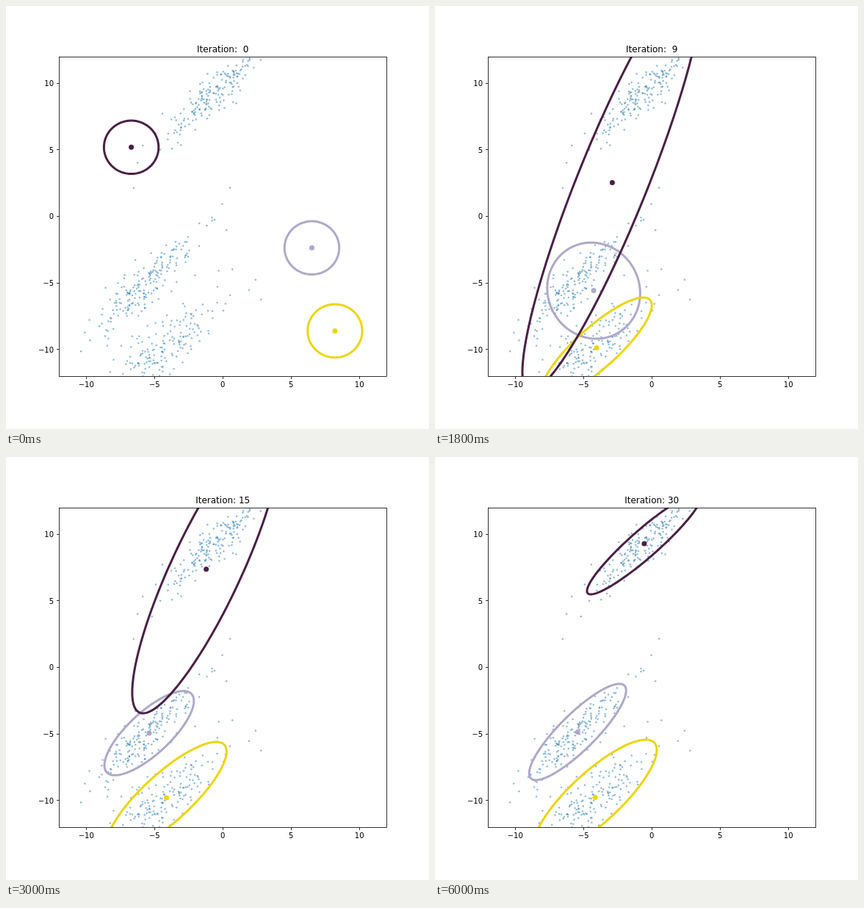
An HTML page that plays this animation: 576 px wide and 576 px high, repeating every 6200 ms.

```html
<!DOCTYPE html>
<html lang="en">
<head>
<meta charset="utf-8">
<title>Mixture fit</title>
<style>
  html, body { margin: 0; width: 100%; height: 100%; overflow: hidden; background: #fff; }
  svg { display: block; width: 576px; height: 576px; }
  text { font-family: "DejaVu Sans", sans-serif; font-size: 10px; fill: #000; white-space: pre; }
  #title { font-size: 12px; text-anchor: middle; }
  #points { fill: #1f77b4; fill-opacity: .5; }
  #rings { fill: none; stroke-width: 3; stroke-linejoin: round; }
  #axes { fill: none; stroke: #000; stroke-width: .8; }
  .x { text-anchor: middle; }
  .y { text-anchor: end; }
</style>
</head>
<body>
<svg viewBox="0 0 576 576">
  <clipPath id="plot"><rect x="72" y="69.12" width="446.4" height="434.88"/></clipPath>
  <g clip-path="url(#plot)">
    <g id="points"></g>
    <g id="centres"></g>
    <g id="rings"></g>
  </g>
  <g id="axes"><rect x="72.5" y="69.5" width="446" height="435"/></g>
  <g id="labels"></g>
  <text id="title" x="295.2" y="63"></text>
</svg>
<script>
const STEP = 200, COUNT = 31;
const UNIT_X = 18.6, UNIT_Y = 18.12;
const toX = v => 295.2 + UNIT_X * v;
const toY = v => 286.56 - UNIT_Y * v;

// A shape is [centre x, centre y, half width, half height, correlation]:
// an ellipse at two standard deviations of a cloud.
const circle = (x, y) => [toX(x), toY(y), 2 * UNIT_X, 2 * UNIT_Y, 0];
const TOP = [285, 118, 78, 69, .933];
const LEFT = [194.2, 374.4, 66, 65.5, .86];
const LOW = [218, 463.5, 84, 78.5, .822];
const BELOW = [186, 396, 66, 66, .86];

const lerp = (a, b, p) => a.map((v, i) => v + (b[i] - v) * p);

// Piecewise blend through [iteration, shape] stops, held at both ends.
function blend(stops, n) {
  const i = stops.findIndex(([at]) => at >= n);
  if (i < 0) return stops[stops.length - 1][1];
  if (i === 0) return stops[0][1];
  const [from, a] = stops[i - 1], [to, b] = stops[i];
  return lerp(a, b, (n - from) / (to - from));
}

// Shape of two clouds taken as one, with the given share from the second.
function merge(a, b, share) {
  const [x, y, ...own] = a, dx = 2 * (b[0] - x), dy = 2 * (b[1] - y);
  const mix = (p, q, gap) => (1 - share) * p + share * q + share * (1 - share) * gap;
  const w = Math.sqrt(mix(a[2] ** 2, b[2] ** 2, dx * dx));
  const h = Math.sqrt(mix(a[3] ** 2, b[3] ** 2, dy * dy));
  const cov = mix(a[2] * a[3] * a[4], b[2] * b[3] * b[4], -dx * dy);
  return [x + share * dx / 2, y + share * dy / 2, w, h, cov / (w * h)];
}

// The dark ring lets go of the lower cloud: slowly, then at a steady rate.
function lowerShare(n) {
  const slow = .5 / (1 + Math.exp((n - 13) / 2));
  return Math.max(0, Math.min(slow, (17 - n) / 16));
}

const LILAC_STOPS = [
  [3, [248.8, 411.7, 55, 76.5, .07]],
  [7, [228, 394, 66, 77, -.26]],
  [11, [204.2, 381.2, 60.5, 53.8, .15]],
  [13, [195.6, 377.6, 55.8, 49.2, .67]],
  [17, LEFT]
];
const YELLOW_STOPS = [
  [3, [215.5, 470.3, 72.5, 62, .82]],
  [7, [220.5, 466, 73, 66, .853]],
  [17, LOW]
];

const RINGS = [
  { color: '#b0a8c8', start: circle(6.52, -2.36), fit: n => blend(LILAC_STOPS, n) },
  { color: '#ecd60c', start: circle(8.21, -8.6), fit: n => blend(YELLOW_STOPS, n) },
  { color: '#4a2046', start: circle(-6.7, 5.2), fit: n => merge(TOP, BELOW, lowerShare(n)) }
];

const $ = id => document.getElementById(id);

function add(parent, tag, attrs, text = '') {
  const el = document.createElementNS('http://www.w3.org/2000/svg', tag);
  for (const k in attrs) el.setAttribute(k, attrs[k]);
  el.textContent = text;
  return $(parent).appendChild(el);
}

let seed = 20;
function random() {
  seed = (seed * 16807) % 2147483647;
  return seed / 2147483647;
}

function addPoint(cx, cy) {
  add('points', 'circle', { cx, cy, r: 1.25 });
}

function addCloud([cx, cy, w, h, r], count) {
  for (let i = 0; i < count; i++) {
    const d = Math.sqrt(-2 * Math.log(random())), a = 2 * Math.PI * random();
    const u = d * Math.cos(a), v = d * Math.sin(a);
    addPoint(cx + w / 2 * u, cy - h / 2 * (r * u + Math.sqrt(1 - r * r) * v));
  }
}

// A few loose points trail up and to the right of the left cloud.
function addTrail() {
  for (let i = 0; i < 5; i++) addPoint(263 + 10.5 * i, 322 - 18 * i + 12 * (random() - .5));
}

function drawAxes() {
  for (let v = -10; v <= 10; v += 5) {
    const x = toX(v), y = toY(v);
    const label = String(v).replace('-', '\u2212');
    add('axes', 'path', { d: `M${Math.floor(x) + .5} 504.5v3.5M72.5 ${Math.floor(y) + .5}h-3.5` });
    add('labels', 'text', { class: 'x', x, y: 519 }, label);
    add('labels', 'text', { class: 'y', x: 65, y: Math.round(y + 3.8) }, label);
  }
}

function ringPath([cx, cy, w, h, r]) {
  const lag = Math.acos(r), pts = [];
  for (let i = 0; i < 160; i++) {
    const t = i * Math.PI / 80;
    pts.push((cx + w * Math.cos(t)).toFixed(2) + ' ' + (cy - h * Math.cos(t - lag)).toFixed(2));
  }
  return 'M' + pts.join('L') + 'Z';
}

drawAxes();
[TOP, LEFT, LOW].forEach(shape => addCloud(shape, 190));
addTrail();
for (const ring of RINGS) {
  ring.dot = add('centres', 'circle', { r: 3.5, fill: ring.color });
  ring.line = add('rings', 'path', { stroke: ring.color });
}

let shown = -1;
function show(n) {
  if (n === shown) return;
  shown = n;
  $('title').textContent = 'Iteration: ' + String(n).padStart(2, '\u00a0');
  for (const { dot, line, start, fit } of RINGS) {
    const shape = n === 0 ? start : fit(n);
    dot.setAttribute('cx', shape[0]);
    dot.setAttribute('cy', shape[1]);
    line.setAttribute('d', ringPath(shape));
  }
}

const begin = performance.now();
function tick() {
  show(Math.floor((performance.now() - begin) / STEP) % COUNT);
  requestAnimationFrame(tick);
}
tick();
</script>
</body>
</html>
```
